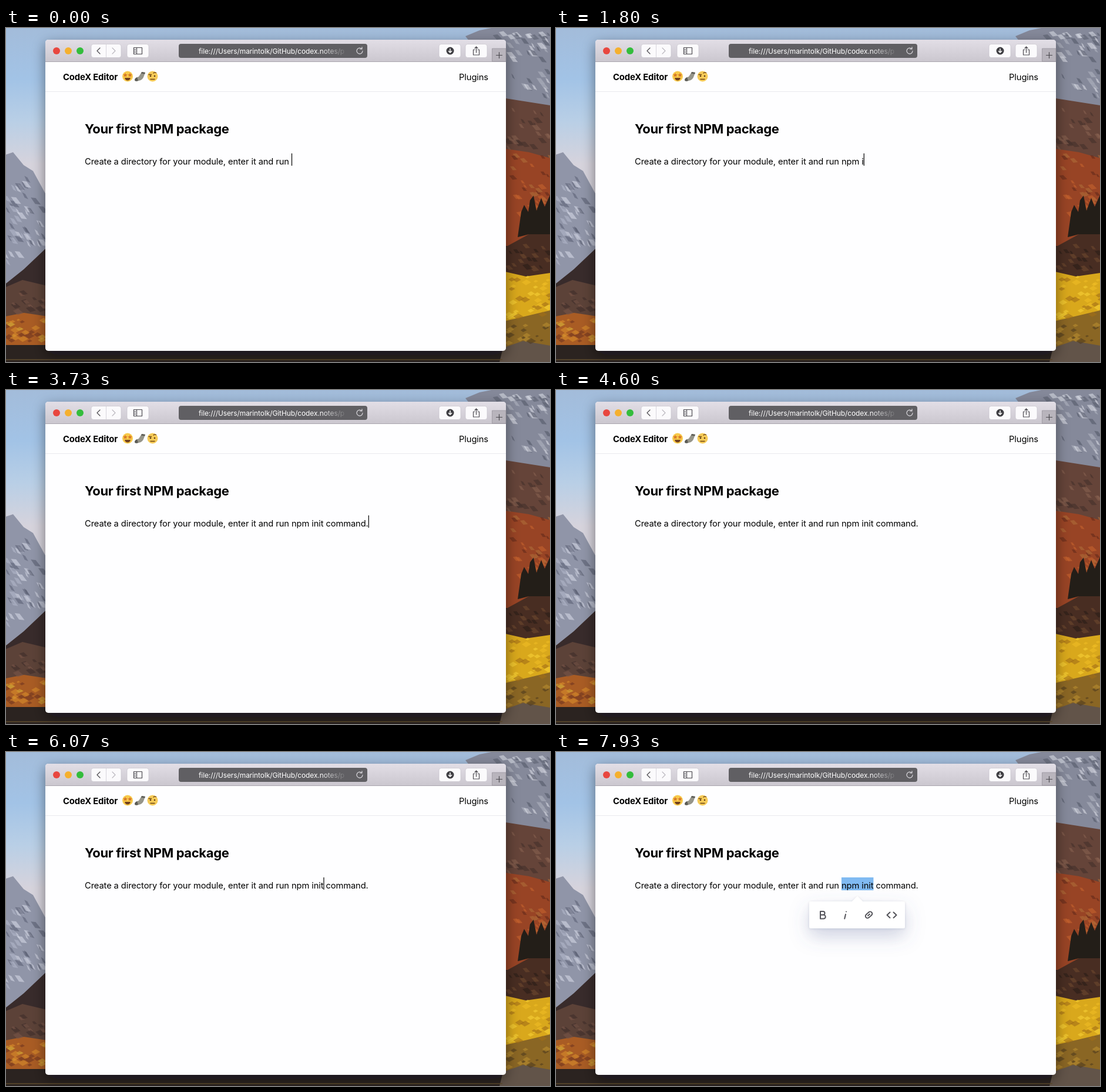
An HTML page for the animation above (8000 ms loop, 926 by 570 pixels).

```html
<!DOCTYPE html>
<html lang="en">
<head>
<meta charset="utf-8">
<title>Editor</title>
<style>
  html, body { margin: 0; width: 100%; height: 100%; overflow: hidden; }
  svg { display: block; width: 926px; height: 570px; }
  text { font-family: Inter, "Liberation Sans", sans-serif; font-optical-sizing: none; white-space: pre; fill: #000; }
  .body { font-size: 14.7px; letter-spacing: -.1px; }
  .brand { font-size: 14.8px; font-weight: 700; letter-spacing: -.15px; }
  .title { font-size: 22px; font-weight: 700; letter-spacing: -.37px; }
  .url { font-size: 12px; letter-spacing: -.1px; fill: url(#urlFade); }
  .button { fill: #fbfafc; stroke: #c2bec6; stroke-width: .6; }
  .line { fill: none; stroke: #4c4a50; stroke-width: 1.2; stroke-linecap: round; stroke-linejoin: round; }
  .tool { fill: none; stroke: #54545a; stroke-width: 2; stroke-linecap: round; stroke-linejoin: round; }
</style>
</head>
<body>
<svg id="stage" viewBox="0 0 926 570" xmlns="http://www.w3.org/2000/svg">
  <defs>
    <linearGradient id="sky" x2="0" y2="1">
      <stop offset="0" stop-color="#a3bcda"/>
      <stop offset=".3" stop-color="#a2c3e6"/>
      <stop offset=".55" stop-color="#b9cfe6"/>
      <stop offset=".8" stop-color="#d6d3dc"/>
    </linearGradient>
    <linearGradient id="bar" x2="0" y2="1">
      <stop offset="0" stop-color="#e2dee6"/>
      <stop offset="1" stop-color="#cbc7cf"/>
    </linearGradient>
    <linearGradient id="urlFade" gradientUnits="userSpaceOnUse" x1="535" x2="582">
      <stop offset="0" stop-color="#fff"/>
      <stop offset="1" stop-color="#fff" stop-opacity="0"/>
    </linearGradient>
    <filter id="windowShadow" x="-10%" y="-10%" width="120%" height="125%">
      <feDropShadow dx="0" dy="7" stdDeviation="11" flood-color="#0c0c14" flood-opacity=".45"/>
    </filter>
    <filter id="popupShadow" x="-40%" y="-80%" width="180%" height="320%">
      <feDropShadow dx="0" dy="13" stdDeviation="16" flood-color="#52659c" flood-opacity=".25"/>
      <feDropShadow dx="0" dy="1" stdDeviation="2" flood-color="#3c4666" flood-opacity=".16"/>
    </filter>
  </defs>

  <!-- Mountain landscape -->
  <rect width="926" height="570" fill="#2b2320"/>
  <rect width="926" height="290" fill="url(#sky)"/>
  <path fill="#9095a8" d="M0 216 12 212 30 234 46 244 70 288V440H0Z"/>
  <path fill="#382b2b" d="M0 436 30 412 70 374V500H0Z"/>
  <path fill="#5c4238" d="M0 442 28 430 70 440V500H0Z"/>
  <path fill="#a95c24" d="M0 492 30 486 70 492V541H0Z"/>
  <path fill="#85899a" d="M782 14 806 4 826 0H926V150H850V100Z"/>
  <path fill="#654439" d="M850 120 926 132V235H850Z"/>
  <path fill="#984425" d="M850 206 890 212 926 222V372H850Z"/>
  <path fill="#482d22" d="M850 374 890 352 926 338V440H850Z"/>
  <path fill="#d9a81c" d="M850 416 885 424 926 418V515H850Z"/>
  <path fill="#8a6624" d="M850 500 926 482V545H850Z"/>
  <path fill="#625449" d="M846 546 880 534 926 542V570H840Z"/>
  <g id="texture"></g>
  <path fill="#231e18" d="M871 357 877 314 882 302 889 314 892 294 898 286 903 312 911 290 917 305 926 285V352L890 352Z"/>
  <path stroke="#5e4b2c" stroke-width="1.5" d="M0 566H845"/>

  <!-- Browser window -->
  <rect x="67" y="20" width="784" height="531" rx="5" fill="#fefeff" filter="url(#windowShadow)"/>
  <path fill="url(#bar)" d="M67 57V25a5 5 0 0 1 5-5H846a5 5 0 0 1 5 5V57Z"/>
  <path stroke="#aaa6ae" d="M67 57.5H851"/>
  <circle cx="86" cy="39" r="6" fill="#e8473f"/>
  <circle cx="106" cy="39" r="6" fill="#f5b02e"/>
  <circle cx="126" cy="39" r="6" fill="#34bd3c"/>
  <rect class="button" x="145" y="27.5" width="51" height="23" rx="4"/>
  <rect class="button" x="206" y="27.5" width="37" height="23" rx="4"/>
  <rect class="button" x="737" y="27.5" width="37" height="23" rx="4"/>
  <rect class="button" x="782" y="27.5" width="37" height="23" rx="4"/>
  <path stroke="#d8d5dc" d="M170.5 28V50"/>
  <path class="line" d="m160 34-5 5 5 5"/>
  <path class="line" style="stroke:#bbb8bf" d="m181 34 5 5-5 5"/>
  <path class="line" d="M217.5 33.5h14v11h-14ZM222.5 34v10M219 36.5h1.5M219 39h1.5M219 41.5h1.5"/>
  <circle cx="756" cy="39" r="6.5" fill="#3f3e43"/>
  <path fill="none" stroke="#fff" stroke-width="1.5" d="M756 35v7m-3-3 3 3 3-3"/>
  <path class="line" d="M798 37h-2.5v9h10v-9H803M800.5 42v-10m-2.500 2.500 2.500-2.500 2.500 2.500"/>
  <path fill="#b8b4bc" stroke="#949099" stroke-width=".7" d="M827.5 57V35H851V57Z"/>
  <path class="line" d="M834.5 46.5h10M839.5 41.5v10"/>
  <rect x="294" y="27" width="321" height="24" rx="4" fill="#605f63"/>
  <text class="url" x="328" y="44">file:///Users/marintolk/GitHub/codex.notes/p</text>
  <path class="line" style="stroke:#d6d4d9" d="M605.5 35.5a5 5 0 1 0 1.500 3.500M606 32.500v3.500h-3.500"/>

  <!-- Page header -->
  <text class="brand" x="97" y="89">CodeX Editor</text>
  <g>
    <circle cx="207" cy="82.500" r="9" fill="#f8c94a"/>
    <path id="star" fill="#d87a2a" d="m203 76.500 1.100 2.400 2.600.3-1.900 1.800.5 2.500-2.300-1.200-2.300 1.200.5-2.500-1.900-1.800 2.600-.3Z"/>
    <use href="#star" x="8"/>
    <path fill="#71401d" d="M202 85h10q-1.200 4.500-5 4.500t-5-4.500Z"/>
    <path fill="#96958a" d="M231 75 237 76 234 84Q232 89 226 90 219 92 219 88 220 85 226 83Z"/>
    <path fill="#5c5c56" d="m231 75 6 1-.8 2.500-6.200-1ZM219 88q1-3 4-4l2 6q-6 2-6-2Z"/>
    <circle cx="249.500" cy="82.500" r="9" fill="#f6cb58"/>
    <circle cx="246" cy="82" r="1.300" fill="#5b3610"/>
    <circle cx="253" cy="82" r="1.300" fill="#5b3610"/>
    <path fill="none" stroke="#6b4212" stroke-width="1.300" stroke-linecap="round" d="M243 79.500h4.500M251 77q2-2 4.500-.5M246 87.500h7"/>
  </g>
  <text class="body" x="821" y="89" text-anchor="end">Plugins</text>
  <path stroke="#e9e9ee" d="M67 108.500H851"/>

  <!-- Document -->
  <text class="title" x="134" y="180">Your first NPM package</text>
  <rect id="selection" y="214" height="22" fill="#80baf2"/>
  <text id="sentence" class="body" x="134" y="233"></text>
  <rect id="caret" y="214" width="1.200" height="21" fill="#000"/>

  <!-- Inline formatting toolbar -->
  <g id="popup">
    <path filter="url(#popupShadow)" fill="#fff" d="M434 255H504L513 246 522 255H591a3 3 0 0 1 3 3V298a3 3 0 0 1-3 3H434a3 3 0 0 1-3-3V258a3 3 0 0 1 3-3Z"/>
    <path class="tool" d="M450 272h4.500a3 3 0 0 1 0 6H450Zm0 6h5.500a3.200 3.200 0 0 1 0 6.500H450Z"/>
    <path class="tool" d="m493 277-1.800 7.500M494 272.500v.1"/>
    <g class="tool" transform="rotate(-42 532.500 278)">
      <path d="M532 274.500h-2.500a3.500 3.500 0 0 0 0 7h2M533 281.500h2.500a3.500 3.500 0 0 0 0-7h-2M530.500 278h4"/>
    </g>
    <path class="tool" d="m568.500 273.500-5 4.700 5 4.700M574.500 273.500l5 4.700-5 4.700"/>
  </g>
</svg>
<script>
const LOOP = 8000;
const INTRO = "Create a directory for your module, enter it and run ";
const COMMAND = "npm init";
const FULL = INTRO + COMMAND + " command.";
const START = INTRO.length, END = START + COMMAND.length;
const FIRST_KEY = 1050, KEY_GAP = 1000 / 6;
const LAST_KEY = FIRST_KEY + (FULL.length - START - 1) * KEY_GAP;
const CLICK = 5900, DRAG_FROM = 6300, DRAG_TO = 6750, POPUP = 6870;

const byId = id => document.getElementById(id);
const [sentence, caret, selection, popup] = ["sentence", "caret", "selection", "popup"].map(byId);
const clamp = (v, low, high) => Math.min(high, Math.max(low, v));
const show = (node, visible) => node.setAttribute("visibility", visible ? "visible" : "hidden");

// Seeded mottling for rock, slopes and foliage
let seed = 7;
const random = () => (seed = seed * 16807 % 2147483647) / 2147483647;
function mottle(x, y, w, h, count, slant, colors) {
  for (let i = 0; i < count; i++) {
    const cx = x + random() * w, cy = y + random() * h, size = 3 + random() * 6;
    const dab = document.createElementNS("http://www.w3.org/2000/svg", "path");
    dab.setAttribute("d", `M${cx - size} ${cy - slant}L${cx} ${cy - size * .6}L${cx + size} ${cy + slant}L${cx - 1} ${cy + size * .6}Z`);
    dab.setAttribute("fill", colors[i % colors.length]);
    dab.setAttribute("opacity", .6);
    byId("texture").append(dab);
  }
}
mottle(0, 250, 40, 150, 32, 6, ["#d3d7e4", "#5d6277", "#b3b8ca"]);
mottle(35, 295, 32, 80, 16, 6, ["#cdd1de", "#585d70"]);
mottle(0, 445, 67, 40, 14, 2, ["#3d2d2a", "#785547"]);
mottle(0, 498, 67, 38, 28, 0, ["#d98c2c", "#6f3420", "#cf9f34"]);
mottle(826, 8, 100, 8, 12, 3, ["#d6d9e2", "#5c6072"]);
mottle(855, 20, 71, 100, 32, 5, ["#d9dbe4", "#545869", "#afb2c0"]);
mottle(855, 135, 71, 70, 22, 4, ["#44302b", "#876050"]);
mottle(855, 215, 71, 120, 36, 3, ["#c4622e", "#63291a", "#ad6c38"]);
mottle(855, 370, 71, 45, 18, 3, ["#2a1c18", "#6e482f"]);
mottle(855, 425, 71, 70, 36, 0, ["#f6d035", "#a26e18", "#eebd24"]);
mottle(855, 505, 71, 34, 16, 0, ["#4f3b1e", "#b88c30"]);

// Right-hand edge of every character in the finished sentence
sentence.textContent = FULL;
const edges = [...FULL].map((_, i) => sentence.getEndPositionOfChar(i).x);
const edgeAt = count => edges[count - 1];

function render(t) {
  const typed = clamp(1 + Math.floor((t - FIRST_KEY) / KEY_GAP), 0, FULL.length - START);
  const length = START + typed;
  sentence.textContent = FULL.slice(0, length);

  const typing = t >= FIRST_KEY && t < LAST_KEY;
  const lastAction = t >= CLICK ? CLICK : t >= LAST_KEY ? LAST_KEY : 0;
  const blinkOn = typing || (t - lastAction) % 1000 < 500;
  caret.setAttribute("x", edgeAt(t >= CLICK ? END : length));
  show(caret, blinkOn && t < DRAG_FROM);

  const drag = clamp((t - DRAG_FROM) / (DRAG_TO - DRAG_FROM), 0, 1);
  const left = edgeAt(END - Math.ceil(drag * COMMAND.length));
  selection.setAttribute("x", left);
  selection.setAttribute("width", edgeAt(END) - left);
  show(popup, t >= POPUP);
}

const origin = performance.now();
function tick() {
  render((performance.now() - origin) % LOOP);
  requestAnimationFrame(tick);
}
tick();
</script>
</body>
</html>
```
